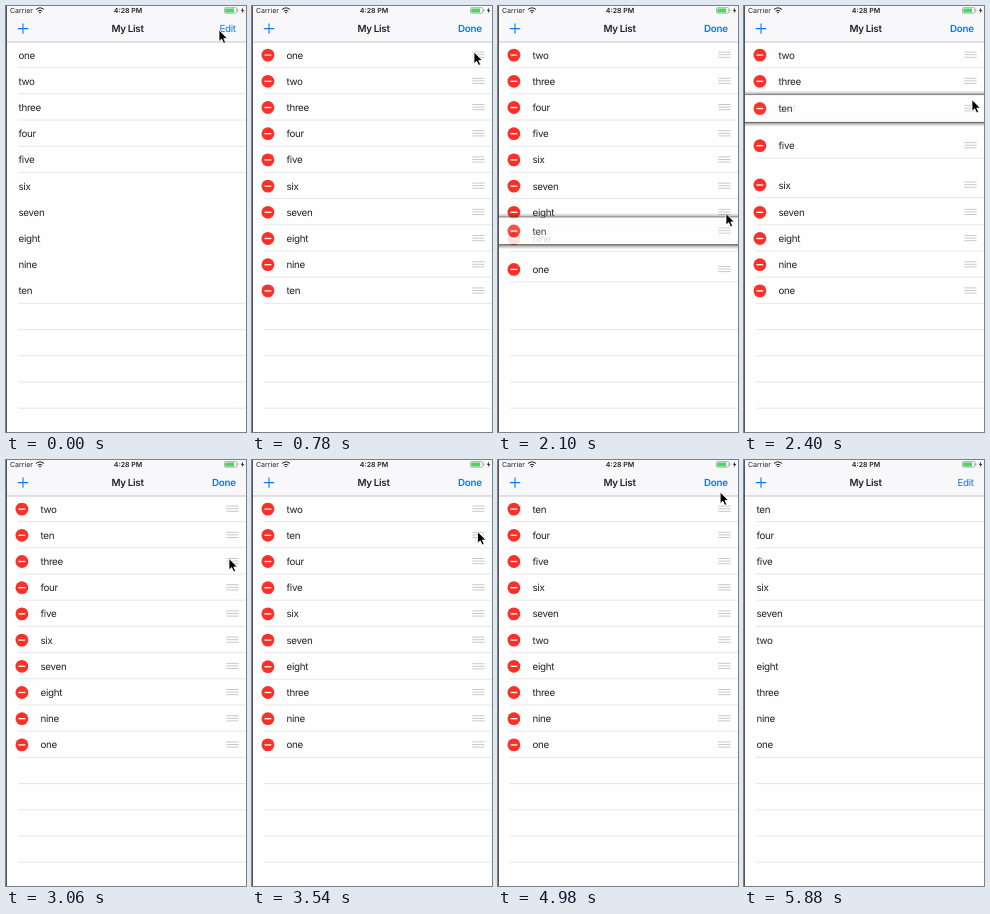
Write an HTML page that moves like this. It is 240 px wide and 426 px high and loops after 6000 ms.

```html
<!DOCTYPE html>
<html lang="en">
<head>
<meta charset="utf-8">
<title>My List</title>
<style>
  html, body { margin: 0; width: 100%; height: 100%; overflow: hidden; background: #fff; }
  svg { display: block; width: 100vw; height: 100vh; }
  text { font: 9.8px Inter, Roboto, sans-serif; letter-spacing: -.3px; fill: #222; text-rendering: geometricPrecision; }
  .bar { font-size: 7px; letter-spacing: 0; }
  .bold { font-weight: 600; }
  .blue { fill: #0a78f5; }
  .line { stroke: #e4e4e8; stroke-width: .9; }
</style>
</head>
<body>
<svg id="stage" viewBox="0 0 240 426">
  <defs>
    <linearGradient id="up" x1="0" y1="1" x2="0" y2="0">
      <stop stop-color="#333" stop-opacity=".75"/>
      <stop offset=".4" stop-color="#333" stop-opacity=".25"/>
      <stop offset="1" stop-color="#333" stop-opacity="0"/>
    </linearGradient>
    <linearGradient id="down" x1="0" y1="0" x2="0" y2="1">
      <stop stop-color="#222" stop-opacity=".85"/>
      <stop offset=".4" stop-color="#222" stop-opacity=".3"/>
      <stop offset="1" stop-color="#222" stop-opacity="0"/>
    </linearGradient>
  </defs>
  <rect width="240" height="426" fill="#fffeff"/>
  <g id="blank"></g>
  <g id="rows"></g>
  <g id="nav">
    <rect width="240" height="36" fill="#f8f7f9"/>
    <path d="M0 36H240" stroke="#b8b8bc" stroke-width=".8"/>
    <text class="bar" x="4" y="7">Carrier</text>
    <path d="M30 3.5Q34 .2 38 3.5M31.7 5.2Q34 3.3 36.3 5.2" fill="none" stroke="#222"/>
    <path d="M32.9 6.2Q34 5.2 35.1 6.2L34 7.5Z" fill="#222"/>
    <text class="bar bold" x="122" y="7" text-anchor="middle">4:28 PM</text>
    <rect x="218.5" y="1.6" width="12.4" height="5.6" rx="1.2" fill="none" stroke="#888" stroke-width=".6"/>
    <rect x="219.3" y="2.4" width="8.8" height="4" rx=".5" fill="#4cd55f"/>
    <path d="M231.8 3.4V5.4" stroke="#888" stroke-width=".8"/>
    <path d="M237.2 1.4L234.8 4.8H236.4L235.7 7.4L238.3 3.9H236.7Z" fill="#222"/>
    <path d="M11.8 22.6H22.2M17 17.4V27.8" stroke="#0a78f5" stroke-width="1.1"/>
    <text class="bold" x="121.5" y="26.4" text-anchor="middle">My List</text>
    <text id="edit" class="blue" x="229.7" y="26.4" text-anchor="end">Edit</text>
    <text id="done" class="blue bold" x="229.7" y="26.4" text-anchor="end">Done</text>
  </g>
  <path d="M.5 0V426" stroke="#555"/>
  <path id="cursor" d="M0 0V11.5L2.7 9.1L4.6 13.3L6.6 12.4L4.8 8.4H8.4Z" stroke="#fff" stroke-width=".8"/>
</svg>
<script>
const LOOP = 6000, STEP = 60, TOP = 36, PITCH = 26.2;
const LAG = 26, SHIFT = 180, SETTLE = 150, GRAB = 3;
const EDIT_ON = 180, EDIT_OFF = 5030, FADE = 240;
const words = ["one", "two", "three", "four", "five", "six", "seven", "eight", "nine", "ten"];

const drags = [
  { word: "one", to: 8, x: 222, start: 855, dur: 686 },
  { word: "ten", to: 1, x: 228, start: 1978, dur: 620 },
  { word: "three", to: 7, x: 223, start: 3120, dur: 230 },
  { word: "two", to: 5, x: 226, start: 3752, dur: 1000 }
];

const $ = id => document.getElementById(id);
const clamp = x => Math.max(0, Math.min(1, x));
const lerp = (a, b, k) => a + (b - a) * k;
const ease = x => (x = clamp(x), x < .5 ? 2 * x * x : 1 - 2 * (1 - x) ** 2);
const easeOut = x => 1 - (1 - clamp(x)) ** 2;
const center = slot => TOP + PITCH * (slot + .5);
const set = (el, attrs) => { for (const k in attrs) el.setAttribute(k, attrs[k]); };

// the pointer reaches for a row, hauls it, and finally goes to the button
const order = [...words], moves = [];
for (const d of drags) {
  d.from = order.indexOf(d.word);
  d.dir = Math.sign(d.to - d.from);
  d.lift = d.start - 50;
  d.drop = d.start + d.dur + LAG;
  d.passed = order.slice(Math.min(d.from, d.to), Math.max(d.from, d.to) + 1).filter(w => w !== d.word);
  d.slots = d.passed.map(w => order.indexOf(w));
  order.splice(d.from, 1);
  order.splice(d.to, 0, d.word);
  moves.push(
    { start: d.start - 400, dur: 300, x: d.x, y: center(d.from) - GRAB },
    { start: d.start, dur: d.dur, x: d.x, y: center(d.to) - GRAB });
}
moves.push({ start: 4780, dur: 250, x: 222, y: 26 });

function pointer(t) {
  let x = 213, y = 24;
  for (const m of moves) {
    const k = easeOut((t - m.start) / m.dur);
    x = lerp(x, m.x, k);
    y = lerp(y, m.y, k);
  }
  return { x, y };
}

const heldY = (d, t) => pointer(t - LAG).y + GRAB;

// a neighbour makes way once the held row reaches its center
for (const d of drags) {
  d.yields = {};
  d.passed.forEach((word, i) => {
    let t = d.start;
    while (t < d.drop && (heldY(d, t) - center(d.slots[i])) * d.dir < 0) t += 2;
    d.yields[word] = t;
  });
}

const edge = PITCH / 2 - .6;
for (let k = 10; k < 15; k++)
  $("blank").innerHTML += `<path class="line" d="M12 ${center(k) + edge}H240"/>`;

const rows = words.map(word => {
  const g = document.createElementNS("http://www.w3.org/2000/svg", "g");
  g.innerHTML = `
    <g class="lifted">
      <rect y="-18" width="240" height="4.5" fill="url(#up)"/>
      <rect y="13.1" width="240" height="5" fill="url(#down)"/>
    </g>
    <g class="cell">
      <rect class="back" y="-13.4" width="240" height="26.5" fill="#fffeff"/>
      <path class="line" d="M12 ${edge}H240"/>
      <g class="minus"><circle r="6.4" fill="#fb3029"/><path d="M-3.4 0H3.4" stroke="#fff" stroke-width="1.3"/></g>
      <text y="3.5">${word}</text>
      <path class="grip" d="M220.3 -3H232.6M220.3 -.4H232.6M220.3 2.2H232.6" stroke="#c9c9cd"/>
    </g>`;
  $("rows").append(g);
  const part = s => g.querySelector(s);
  return { word, g, lifted: part(".lifted"), cell: part(".cell"), back: part(".back"),
    line: part(".line"), minus: part(".minus"), label: part("text"), grip: part(".grip") };
});

function place(word, t) {
  let slot = words.indexOf(word), y = null, lift = 0;
  for (const d of drags) {
    if (word in d.yields) slot -= d.dir * ease((t - d.yields[word]) / SHIFT);
    if (word !== d.word || t < d.lift) continue;
    const down = ease((t - d.drop) / SETTLE);
    slot = d.to;
    lift = ease((t - d.lift) / 120) * (1 - down);
    y = down < 1 ? lerp(heldY(d, Math.min(t, d.drop)), center(slot), down) : null;
  }
  return { slot, y: y ?? center(slot), lift };
}

function draw(t) {
  const e = ease((t - EDIT_ON) / FADE) - ease((t - EDIT_OFF) / FADE);
  for (const r of rows) {
    const { slot, y, lift } = place(r.word, t);
    const shown = slot > 4.5 && slot < 8.5 ? e : 1;
    set(r.g, { transform: `translate(0 ${y})` });
    set(r.lifted, { opacity: lift });
    set(r.cell, { opacity: 1 - .15 * lift });
    set(r.back, { opacity: lift > 0 ? 1 : 0 });
    set(r.line, { opacity: shown * (1 - lift) });
    set(r.minus, { transform: `translate(${lerp(-6, 15.9, e)} 0)`, opacity: e });
    set(r.label, { x: 12.5 + 22 * e });
    set(r.grip, { transform: `translate(${16 * (1 - e)} 0)`, opacity: e });
    if (lift > 0 && r.g !== $("rows").lastChild) $("rows").append(r.g);
  }
  set($("edit"), { opacity: 1 - e });
  set($("done"), { opacity: e });
  const { x, y } = pointer(t);
  set($("cursor"), {
    transform: `translate(${x} ${y})`,
    opacity: t < 5820 ? 1 : t < 5880 ? .5 : 0
  });
}

function tick() {
  const t = Math.floor(performance.now() % LOOP / STEP) * STEP;
  draw(Math.min(t, 5880));
  requestAnimationFrame(tick);
}
tick();
</script>
</body>
</html>
```
